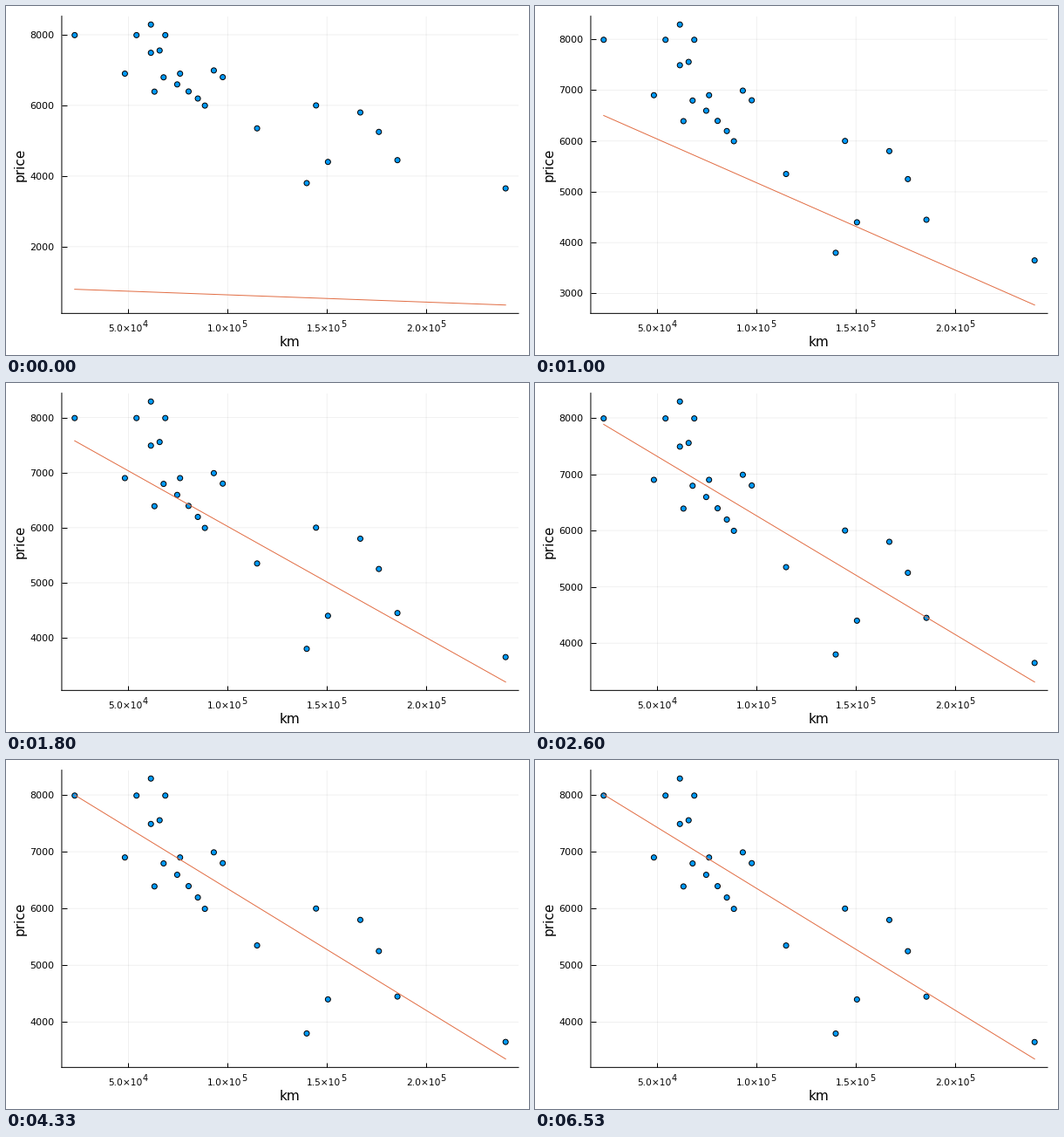
A matplotlib script for the animation above (6740 ms loop, 600 by 400 pixels).

```python
import numpy as np
import matplotlib.pyplot as plt
from matplotlib.animation import FuncAnimation
from matplotlib.ticker import MultipleLocator

W, H, DPI = 600, 400, 100
LEFT, RIGHT, TOP, BOTTOM = 63.95, 588, 11.6, 352.35
LOOP, STEP = 6740, 20          # ms
FPS, EPOCHS = 15, 101
PX = 72 / DPI                  # one pixel in points

# Best line: its centre, its slope and the learning rates towards both
MEAN_KM, MEAN_PRICE, SLOPE = 101066, 6331.8, -0.02145
RATE = 0.1
SLOPE_RATE = RATE * 23 / 24

plt.rcParams["font.family"] = "DejaVu Sans"


def cars():
    """Thousands of km and price: three regular groups and some strays."""
    i = np.arange(5)
    band = 88.5 - 3 * i - 0.55 * i ** 2, 5995 + 200 * i
    turn = np.pi / 2 * i[:4]
    ring = (61.3 + 7.25 * np.cos(turn),
            7990 + 400 * np.sin(turn) - 100 * np.sin(turn) ** 2)
    j = i[:3]
    arc = 166.8 + 9.35 * j, 5800 - 425 * j - 125 * j ** 2
    strays = np.transpose([
        (22.9, 7990), (48.2, 6900), (63.1, 6390), (65.7, 7555),
        (76, 6900), (93, 6990), (97.5, 6800), (114.8, 5350),
        (139.8, 3800), (144.5, 6000), (150.5, 4400), (240, 3650)])
    return np.hstack([band, ring, arc, strays])


def fitted(epoch):
    """Line values at both ends after some epochs of gradient descent."""
    level = MEAN_PRICE * (1 - (1 - RATE) ** epoch)
    slope = SLOPE * (1 - (1 - SLOPE_RATE) ** epoch)
    return level + slope * (ends - MEAN_KM)


def widen(low, high):
    margin = 0.03 * (high - low)
    return low - margin, high + margin


def label(x, y, text, size, **kw):
    return fig.text(x / W, 1 - y / H, text, fontsize=size, va="baseline", **kw)


km, price = cars()
km = km * 1000
ends = np.array([km.min(), km.max()])

fig = plt.figure(figsize=(W / DPI, H / DPI), dpi=DPI, facecolor="white")
ax = fig.add_axes([LEFT / W, 1 - BOTTOM / H,
                   (RIGHT - LEFT) / W, (BOTTOM - TOP) / H])
ax.set_axisbelow(True)
ax.spines[["top", "right"]].set_visible(False)
for side in ("left", "bottom"):
    ax.spines[side].set(linewidth=PX, snap=False)
ax.tick_params(direction="in", length=5.5 * PX, width=PX, pad=8.4 * PX,
               labelsize=8)
ax.grid(color="black", alpha=0.06, linewidth=PX, snap=False)

x_low, x_high = widen(*ends)
ax.set_xlim(x_low, x_high)
x_ticks = np.arange(1, 5) * 50000
ax.set_xticks(x_ticks, labels=[""] * len(x_ticks))
for tick in x_ticks:
    power = int(np.log10(tick))
    x = LEFT + (tick - x_low) / (x_high - x_low) * (RIGHT - LEFT) + 16.2
    label(x, 373, f"{tick / 10 ** power:.1f}×10", 10.6 * PX, ha="right")
    label(x - 0.2, 368, str(power), 9.8 * PX, ha="left")

label((LEFT + RIGHT) / 2, 390, "km", 11, ha="center")
label(20.6, (TOP + BOTTOM) / 2, "price", 11, ha="center", rotation=90,
      rotation_mode="anchor")

# One size per dot keeps their positions from being rounded to whole pixels
ax.scatter(km, price, s=np.full(len(km), (6 * PX) ** 2), color="#009afa",
           edgecolors="black", linewidths=PX, zorder=3)
line, = ax.plot(ends, fitted(1), color="#e26f46", linewidth=PX, zorder=4)


def update(n):
    centis = (n + 0.5) * STEP / 10
    epoch = min(int((centis + 0.5) * FPS / 100) + 1, EPOCHS)
    values = fitted(epoch)
    line.set_ydata(values)
    low, high = widen(min(values.min(), price.min()),
                      max(values.max(), price.max()))
    ax.set_ylim(low, high)
    ax.yaxis.set_major_locator(MultipleLocator(2000 if low < 1000 else 1000))
    return line,


anim = FuncAnimation(fig, update, frames=LOOP // STEP, interval=STEP,
                     init_func=lambda: update(0), repeat=True, repeat_delay=0)
plt.show()
```
